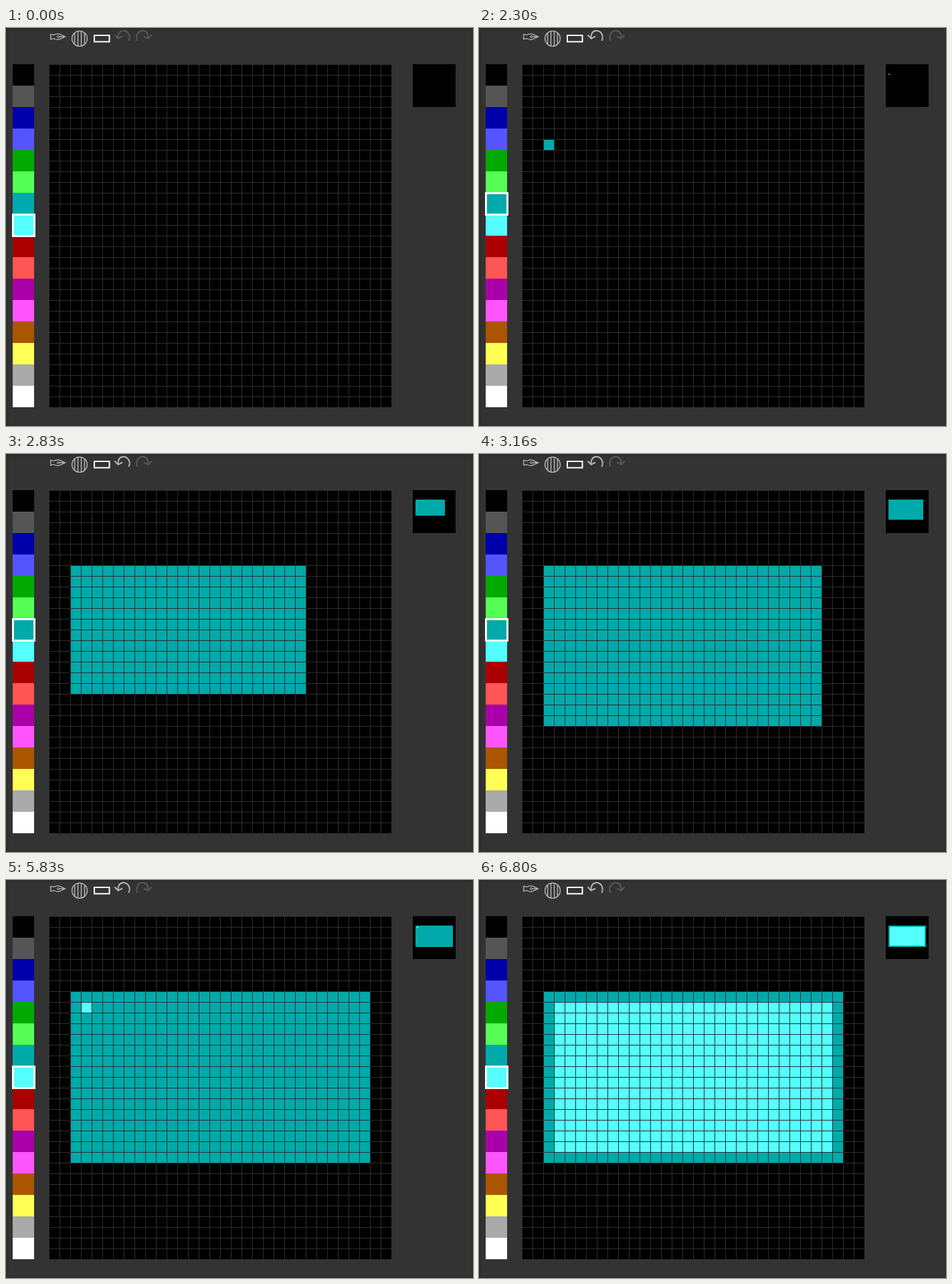
An HTML page for the animation above (8000 ms loop, 698 by 594 pixels).

```html
<!DOCTYPE html>
<html lang="en">
<head>
<meta charset="utf-8">
<title>Pixel editor</title>
<style>
  html, body { margin: 0; width: 100%; height: 100%; overflow: hidden; background: #333; }
  body { box-shadow: inset 1px 1px 4px #262626; }
  svg { display: block; width: 100%; height: 100%; }
  .icon { fill: none; stroke: #b4b4b4; stroke-width: 1.5; }
  .arrow { stroke-width: 2; }
  .off { stroke: #585858; }
  .crisp { shape-rendering: crispEdges; }
</style>
</head>
<body>
<svg viewBox="0 0 698 594">
  <g class="icon">
    <path d="M66.7 9.3 L72 10.3 Q76 7.8 80 9.2 L88.5 13 L80 16.8 Q76 18.2 72 15.7 L66.7 16.7 Z M79.5 13 H88.5" stroke-width="1.3"/>
    <circle cx="78" cy="13" r="1.5" stroke-width="1"/>
    <circle cx="110" cy="15.8" r="11.4"/>
    <path d="M102.6 7.5 V24 M107.5 4.5 V27 M112.5 4.5 V27 M117.4 7.5 V24"/>
    <rect x="132" y="11" width="22.5" height="9.5" stroke="#fff" stroke-width="2"/>
    <path id="undo" class="arrow"/>
    <path id="redo" class="arrow off" transform="matrix(-1 0 0 1 380 0)"/>
  </g>
  <g class="crisp">
    <g id="palette"></g>
    <rect x="64" y="54" width="512" height="512"/>
    <rect x="608" y="54" width="64" height="64"/>
    <g id="boxes"></g>
    <path id="grid" fill="none" stroke="#2e2e2e"/>
  </g>
  <rect id="marker" x="10.5" width="32" height="32" fill="none" stroke="#fff" stroke-width="3"/>
</svg>
<script>
const LOOP = 8000, CELL = 16, DOT = 2, TOP = 54;
const COLORS = ['#000', '#555', '#00a', '#55f', '#0a0', '#5f5', '#0aa', '#5ff',
                '#a00', '#f55', '#a0a', '#f5f', '#a50', '#ff5', '#aaa', '#fff'];
const TEAL = 6, CYAN = 7;
const PICKS = [[0, CYAN], [1030, TEAL], [4900, CYAN]];

// Each drag step: time, columns, rows
const DRAGS = [
  { color: TEAL, col: 2, row: 7, steps: [
    [2300, 1, 1], [2330, 1, 1], [2430, 5, 3], [2630, 16, 10], [2850, 23, 13],
    [3100, 26, 14], [3130, 26, 15], [3200, 27, 15], [3300, 27, 16], [3430, 28, 16]] },
  { color: CYAN, col: 3, row: 8, steps: [
    [5830, 1, 1], [5930, 4, 3], [6130, 16, 9], [6199, 16, 9], [6200, 17, 9],
    [6350, 22, 12], [6560, 25, 13], [6700, 26, 13], [6800, 26, 14]] },
];

const byId = id => document.getElementById(id);

function setAttrs(node, attrs) {
  for (const key in attrs) node.setAttribute(key, attrs[key]);
}

function addRect(parent, attrs) {
  const node = document.createElementNS(parent.namespaceURI, 'rect');
  setAttrs(node, attrs);
  return parent.appendChild(node);
}

COLORS.forEach((fill, i) =>
  addRect(byId('palette'), { x: 10, y: TOP + 32 * i, width: 32, height: 32, fill }));

const arrow = 'M183.5 19 C187 11 182 4 175.5 4 C170.5 4 167.5 8 167.5 15 M162.5 10.5 L167.5 15.8 L174 12.5';
byId('undo').setAttribute('d', arrow);
byId('redo').setAttribute('d', arrow);

let lines = '';
for (let i = 0; i < 32; i++) {
  const offset = i * CELL + 0.5;
  lines += `M${64 + offset} 54v512M64 ${TOP + offset}h512`;
}
byId('grid').setAttribute('d', lines);

for (const drag of DRAGS) {
  const fill = COLORS[drag.color];
  drag.views = [[64, CELL], [608, DOT]].map(([left, size]) => ({
    size,
    node: addRect(byId('boxes'), { x: left + drag.col * size, y: TOP + drag.row * size, fill }),
  }));
}

function sizeAt(steps, time) {
  if (time < steps[0][0]) return [0, 0];
  const next = steps.findIndex(step => step[0] > time);
  if (next < 0) return steps.at(-1).slice(1);
  const a = steps[next - 1], b = steps[next];
  const part = (time - a[0]) / (b[0] - a[0]);
  return [1, 2].map(k => Math.floor(a[k] + (b[k] - a[k]) * part));
}

function draw(time) {
  const [, picked] = PICKS.findLast(pick => pick[0] <= time);
  byId('marker').setAttribute('y', TOP + 32 * picked + 0.5);
  byId('undo').classList.toggle('off', time < DRAGS[0].steps[0][0]);
  for (const { steps, views } of DRAGS) {
    const [cols, rows] = sizeAt(steps, time);
    for (const { node, size } of views) {
      setAttrs(node, { width: cols * size, height: rows * size });
    }
  }
}

const start = performance.now();
function tick() {
  draw((performance.now() - start) % LOOP);
  requestAnimationFrame(tick);
}
tick();
</script>
</body>
</html>
```
